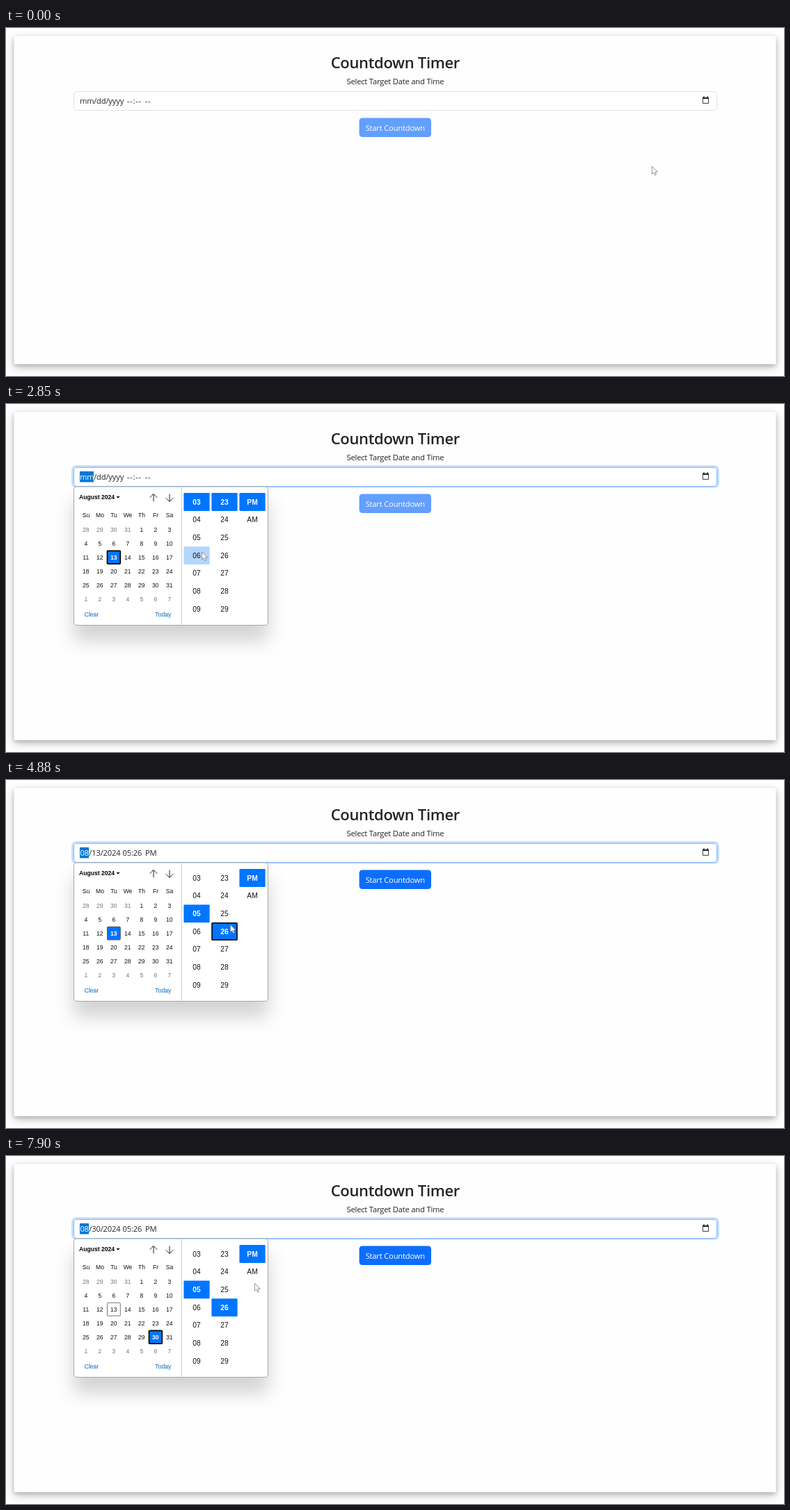
These frames come from a looping animation (1118 px wide and 501 px high, 8 s). An HTML page:

```html
<!DOCTYPE html>
<html lang="en">
<head>
<meta charset="utf-8">
<title>Countdown Timer</title>
<style>
  html, body { margin: 0; width: 100%; height: 100%; overflow: hidden; background: #fff; }
  svg { display: block; width: 1118px; height: 501px; }
  text { white-space: pre; }
  .ui { font-family: "Open Sans", "Noto Sans", sans-serif; font-size: 11.2px; letter-spacing: -.19px; }
  .title { font-size: 22px; font-weight: 600; letter-spacing: -.32px; }
  .dashes { letter-spacing: .7px; }
  .cal { font-family: "Liberation Sans", Arial, sans-serif; font-size: 8.6px; }
  .time { font-size: 10.2px; }
  .bold { font-weight: 700; }
  .card { filter: drop-shadow(0 3px 3px rgba(0, 0, 0, .18)) drop-shadow(0 4px 7px rgba(0, 0, 0, .2)); }
  .popup { filter: drop-shadow(0 22px 13px rgba(0, 0, 0, .17)); }
</style>
</head>
<body>
<svg id="stage" viewBox="0 0 1118 501"></svg>
<script>
const LOOP = 8000, TICK = 100, FADE = 110;
const OPEN = 1140, PICK_HOUR = 3460, PICK_MINUTE = 4780, PICK_DAY = 7070;
const INK = '#212529', BLUE = '#0075ff', HOVER = '#b3d6fd', GREY = '#757575';
const CELL = 20, ROW = 25.7;
const DAY_13 = 16, DAY_30 = 33;
const stage = document.getElementById('stage');

// Key points of the pointer: it moves in ticks from the previous point to (x, y).
const START = { x: 928, y: 199 };
const route = [
  { from: 70, to: 70, x: 931, y: 196 },
  { from: 250, to: 940, x: 1007, y: 102 },
  { from: 1550, to: 1750, x: 333, y: 226 },
  { from: 2030, to: 2133, x: 177, y: 183 },
  { from: 2240, to: 2240, x: 266, y: 135 },
  { from: 2340, to: 2750, x: 281, y: 216 },
  { from: 2850, to: 3360, x: 283, y: 197 },
  { from: 3860, to: 4210, x: 318, y: 250 },
  { from: 4310, to: 4580, x: 322, y: 208 },
  { from: 5290, to: 5780, x: 192, y: 194 },
  { from: 6290, to: 6390, x: 215, y: 221 },
  { from: 6490, to: 6490, x: 203, y: 257 },
  { from: 6590, to: 6880, x: 214, y: 262 },
  { from: 7270, to: 7900, x: 357, y: 183 },
];

function pointerAt(t) {
  let { x, y } = START;
  for (const leg of route) {
    if (t < leg.from) break;
    const steps = Math.round((leg.to - leg.from) / TICK) + 1;
    const u = t >= leg.to ? 1 : (Math.floor((t - leg.from) / TICK) + 1) / steps;
    x += (leg.x - x) * Math.min(1, u);
    y += (leg.y - y) * Math.min(1, u);
  }
  return { x, y };
}

const text = (s, x, y, cls, fill = INK, anchor = 'middle') =>
  `<text x="${x}" y="${y}" class="${cls}" fill="${fill}" text-anchor="${anchor}">${s}</text>`;
const rect = (x, y, w, h, fill, r = 0, extra = '') =>
  `<rect x="${x}" y="${y}" width="${w}" height="${h}" rx="${r}" fill="${fill}" ${extra}/>`;
const box = (cx, cy, w, h, fill, extra = '') => rect(cx - w / 2, cy - h / 2, w, h, fill, 1, extra);
const path = (d, stroke, width, fill = 'none') =>
  `<path d="${d}" fill="${fill}" stroke="${stroke}" stroke-width="${width}"/>`;
const border = (color, width) => `stroke="${color}" stroke-width="${width}"`;
const range = (count, fn) => Array.from({ length: count }, (_, i) => fn(i));

function field(t) {
  const focused = t >= OPEN, filled = t >= PICK_HOUR + TICK;
  const label = (s, x, cls = 'ui', fill = INK) => text(s, x, 109, cls, fill, 'start');
  const lead = focused ? '#fff' : INK;
  let out = '';
  if (focused) out += rect(95.6, 89.6, 927.8, 29.8, 'none', 5.5, border('#c2dbfe', 2.9));
  out += rect(97.5, 91.5, 924, 27, '#fff', 4.3, border(focused ? '#86b7fe' : '#dee2e6', 1));
  if (focused) out += rect(106, 97, filled ? 13 : 20, 15.5, '#0078d7');
  if (filled) {
    const day = t >= PICK_DAY + TICK ? 30 : 13, minute = t >= PICK_MINUTE + TICK ? 26 : 23;
    out += label('08', 106.4, 'ui', lead) + label(`/${day}/2024`, 119.3)
      + label(`05:${minute}`, 167.5) + label('PM', 200);
  } else {
    out += label('mm', 106, 'ui', lead) + label('/dd/yyyy', 126.2)
      + label('--:--', 173.8, 'ui dashes') + label('--', 199.8, 'ui dashes');
  }
  return out + path('M1001.3 100.2h8.2v8.2h-8.2z', '#222', .9)
    + path('M1001 101.2h8.8M1002.9 98.6v2M1007.9 98.6v2', '#222', 1.6);
}

function dayUnder({ x, y }) {
  const col = Math.floor((x - 105) / CELL), row = Math.floor((y - 171) / CELL);
  return col >= 0 && col < 7 && row >= 0 && row < 6 ? row * 7 + col : -1;
}

function calendar(t) {
  const picked = t >= PICK_DAY + TICK ? DAY_30 : DAY_13;
  const dayFocus = t < PICK_HOUR || t >= PICK_DAY;
  const hover = dayUnder(pointerAt(t - TICK));
  let out = text('August 2024', 105, 137, 'cal bold', '#000', 'start')
    + path('M158.6 133h5l-2.5 2.8z', 'none', 0, '#000')
    + path('M212 140.5v-11m-5.2 5.2l5.2-5.2l5.2 5.2', '#222', 1)
    + path('M235 129.5v11m-5.2-5.2l5.2 5.2l5.2-5.2', '#222', 1);
  ['Su', 'Mo', 'Tu', 'We', 'Th', 'Fr', 'Sa'].forEach((name, i) => {
    out += text(name, 115 + CELL * i, 163.3, 'cal', '#111');
  });
  for (let i = 0; i < 42; i++) {
    const x = 114.8 + CELL * (i % 7), y = 181 + CELL * Math.floor(i / 7);
    const frame = (fill, line) => box(x + .1, y - .3, 18.8, 18.8, fill, line);
    const inMonth = i > 3 && i < 35, selected = i === picked;
    const number = i < 4 ? 28 + i : (i - 4) % 31 + 1;
    if (selected) out += frame(BLUE, dayFocus ? border('#000', 1.7) : border('#4a5a70', 1));
    else if (i === hover) out += frame(HOVER, border('#333', 1));
    else if (i === DAY_13) out += frame('none', border(GREY, 1));
    out += text(number, x, y + 3, selected ? 'cal bold' : 'cal', selected ? '#fff' : inMonth ? '#111' : GREY);
  }
  return out + text('Clear', 112.7, 306, 'cal', '#0067c8', 'start')
    + text('Today', 237.3, 306, 'cal', '#0067c8', 'end')
    + rect(252, 119.5, 1, 198, '#ccc');
}

function timeColumn(x, labels, picked, focused, pointer) {
  const hover = Math.abs(pointer.x - x) < 19 ? Math.floor((pointer.y - 128) / ROW) : -1;
  return labels.map((label, i) => {
    const y = 141 + ROW * i, on = i === picked;
    let out = '';
    if (on || i === hover) out += box(x, y, 37.2, 25.8, on ? BLUE : HOVER);
    if (on && focused) out += box(x, y, 35.8, 24.4, 'none', border('#000', 1.5));
    return out + text(label, x, y + 3.6, on ? 'cal time bold' : 'cal time', on ? '#fff' : '#111');
  }).join('');
}

function timeColumns(t, pointer) {
  const hours = range(7, i => '0' + (3 + i)), minutes = range(7, i => 23 + i);
  const hourFocus = t >= PICK_HOUR && t < PICK_MINUTE;
  const minuteFocus = t >= PICK_MINUTE && t < PICK_DAY;
  return timeColumn(274, hours, t >= PICK_HOUR + TICK ? 2 : 0, hourFocus, pointer)
    + timeColumn(314, minutes, t >= PICK_MINUTE + TICK ? 3 : 0, minuteFocus, pointer)
    + timeColumn(354, ['PM', 'AM'], 0, false, pointer);
}

function cursor({ x, y }, pressed) {
  const halo = pressed ? `<circle cx="${x}" cy="${y}" r="9" fill="#dde032" fill-opacity=".7"/>` : '';
  return halo + `<g transform="translate(${x} ${y})">`
    + path('M.3 .2V11.2L2.8 8.9L4.7 13L6.5 12.2L4.7 8.2H8.2Z', '#666', .7, '#fff') + '</g>';
}

function scene(t) {
  const pointer = pointerAt(t);
  const pressed = [OPEN, PICK_HOUR, PICK_MINUTE, PICK_DAY].some(click => t >= click && t < click + TICK);
  let out = rect(11.5, 11.5, 1095, 472.5, '#fefefe', 0, 'class="card"')
    + text('Countdown Timer', 559.3, 57.6, 'ui title')
    + text('Select Target Date and Time', 559.4, 81, 'ui')
    + field(t)
    + rect(507.6, 129.5, 103.4, 27.4, t >= PICK_HOUR + TICK ? '#0d6efd' : '#629fff', 4.3)
    + text('Start Countdown', 559.3, 147.8, 'ui', '#fff');
  if (t >= OPEN + FADE) out += rect(97.5, 119, 279, 199.5, '#fff', 4.5, `class="popup" ${border('#a9a9a9', 1)}`);
  if (t >= OPEN + 2 * FADE) out += calendar(t) + timeColumns(t, pointer);
  return out + cursor(pointer, pressed);
}

let shown = '';
function draw() {
  const next = scene(performance.now() % LOOP);
  if (next !== shown) stage.innerHTML = shown = next;
  requestAnimationFrame(draw);
}
draw();
</script>
</body>
</html>
```
